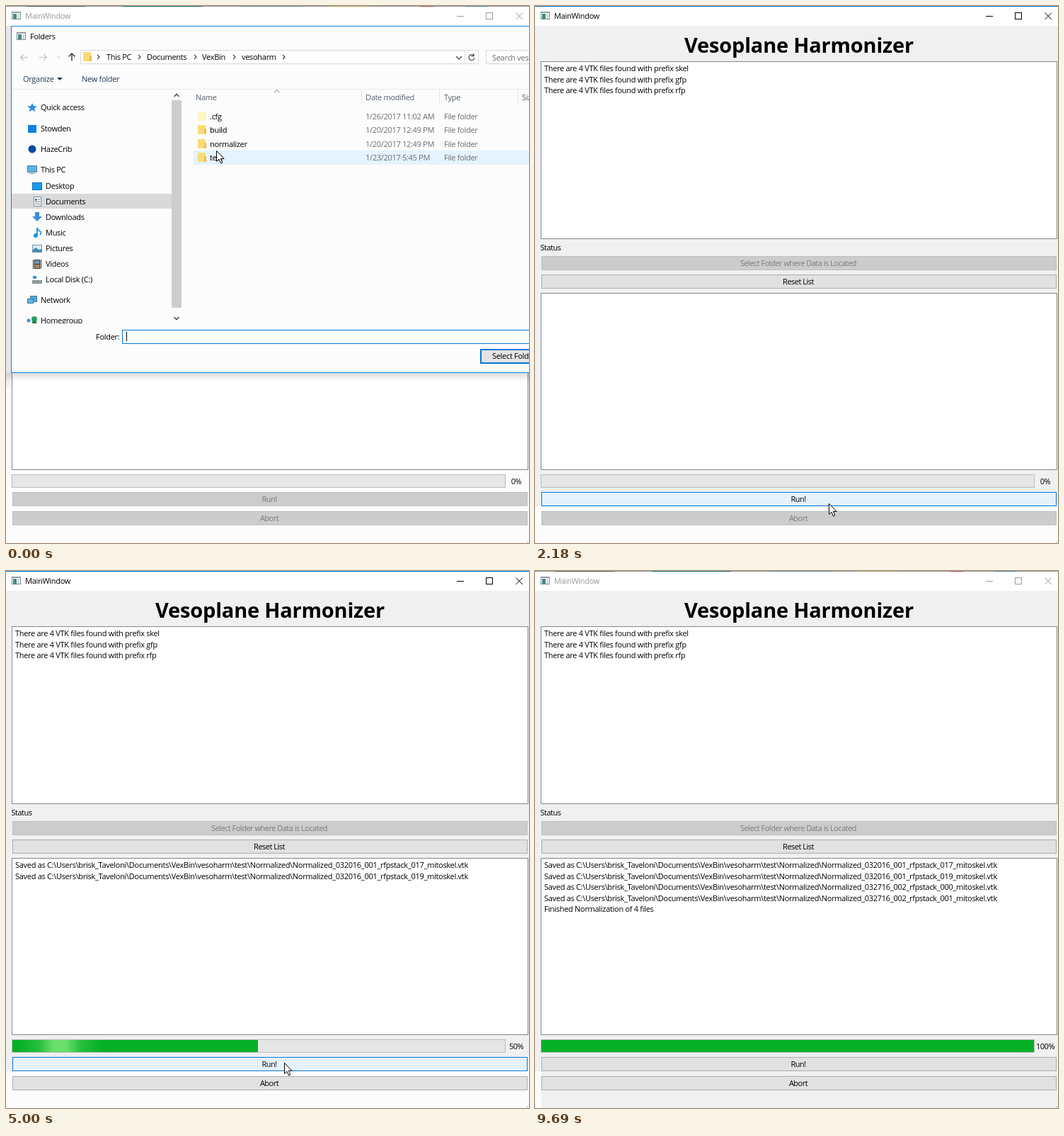
Write an HTML page that moves like this. It is 739 px wide and 758 px high and loops after 9.83 s.

```html
<!DOCTYPE html>
<html lang="en">
<head>
<meta charset="utf-8">
<title>Normalization run</title>
<style>
  html, body { margin: 0; width: 100%; height: 100%; overflow: hidden; background: #fcfcfc; }
  #stage { display: block; width: 739px; height: 758px; }
  text { font: 11px "Open Sans", "Noto Sans", sans-serif; letter-spacing: -.3px; white-space: pre; }
  text.label { letter-spacing: -.5px; }
  text.big { font-size: 29px; font-weight: 700; letter-spacing: -.2px; }
  rect { shape-rendering: crispEdges; }
</style>
</head>
<body>
<svg id="stage" viewBox="0 0 739 758"></svg>
<script>
const LOOP = 9830;

// Each step changes some fields of the state and keeps the others.
const STEPS = [
  [0, { cur: [297, 204], caret: true, dlg: 1, strip: false, active: false, picked: false,
        run: 'off', abort: 'off', lines: 0, pct: 0, glow: false, body: 538, foot: false }],
  [120, { cur: [283, 212], caret: false }],
  [520, { cur: [282, 212] }],
  [670, { picked: true }],
  [820, { cur: [411, 274], strip: true }],
  [940, { cur: [640, 480] }],
  [1090, { cur: [700, 490] }],
  [1210, { cur: [735, 497] }],
  [1360, { dlg: .5, active: true, body: 706 }],
  [1490, { dlg: .06, cur: [735, 500], run: 'normal' }],
  [1760, { dlg: 0, cur: [679, 501] }],
  [1910, { cur: [536, 501] }],
  [2060, { cur: [455, 600] }],
  [2180, { cur: [415, 702], run: 'hot' }],
  [2330, { cur: [400, 705] }],
  [2450, { cur: [394, 698] }],
  [2600, { cur: [393, 694], run: 'down' }],
  [2730, { abort: 'normal' }],
  [2880, { run: 'hot' }],
  [3750, { lines: 1 }],
  [4580, { pct: 25, glow: true }],
  [4730, { lines: 2, pct: 50 }],
  [4850, {}], [5000, {}], [5120, {}],
  [5270, { cur: null }],
  [5390, {}], [5510, {}], [5660, {}],
  [5810, { run: 'normal', foot: true }],
  [5930, {}], [6050, {}], [6200, {}], [6320, {}],
  [6470, { lines: 3, pct: 75 }],
  [7620, { glow: false }],
  [7920, { lines: 4, pct: 100 }],
  [8040, { lines: 5 }],
  [9690, { active: false }],
];

const STYLES = {
  off: ['#ccc', '#bfbfbf', '#7b7b7b'],
  normal: ['#e1e1e1', '#adadad', '#000'],
  hot: ['#e5f1fb', '#0078d7', '#000'],
  down: ['#cce4f7', '#005499', '#000'],
};

const rect = (x, y, w, h, fill, extra = '') =>
  `<rect x="${x}" y="${y}" width="${w}" height="${h}" fill="${fill}" ${extra}/>`;
const box = (x, y, w, h, fill, stroke, width = 1) =>
  rect(x + .5, y + .5, w - 1, h - 1, fill, `stroke="${stroke}" stroke-width="${width}"`);
const text = (x, y, str, fill = '#000', extra = '') =>
  `<text x="${x}" y="${y}" fill="${fill}" ${extra}>${str}</text>`;
const mid = (x, y, str, fill, cls = 'label') => text(x, y, str, fill, `text-anchor="middle" class="${cls}"`);
const line = (d, stroke, width = 1) =>
  `<path d="${d}" fill="none" stroke="${stroke}" stroke-width="${width}"/>`;
const shape = (d, fill) => `<path d="${d}" fill="${fill}"/>`;
const dot = (x, y, r, fill) => `<circle cx="${x}" cy="${y}" r="${r}" fill="${fill}"/>`;

function button(y, label, mode) {
  const [fill, stroke, ink] = STYLES[mode];
  return box(9, y, 728, 20, fill, stroke) + mid(372, y + 14, label, ink);
}

const appIcon = (x, y) => box(x, y, 13, 11, '#fff', '#808890') +
  rect(x + 1, y + 1, 11, 1, '#a9b4bd') + rect(x + 2, y + 3, 5, 7, '#3f8a86') + rect(x + 8, y + 3, 3, 7, '#d5dadd');

const folder = (x, y, light) =>
  rect(x, y, 11, 13, light ? '#fdf6c4' : '#fbdc7a') +
  rect(x + 9, y + 5, 3, 8, light ? '#fbf3bd' : '#eec04c');

function titleBar(active) {
  const ink = active ? '#000' : '#999';
  const edge = active ? rect(0, 0, 739, 1, '#0078d7') :
    rect(0, 0, 739, 1, '#8f9799') + rect(28, 0, 84, 1, '#4d5b5e') + rect(165, 0, 112, 1, '#0c6468') +
    rect(330, 0, 90, 1, '#5c8f96') + rect(455, 0, 60, 1, '#b8a06a') + rect(585, 0, 20, 1, '#b3473d') +
    rect(650, 0, 30, 1, '#3f79a8');
  return rect(0, 0, 739, 28, '#fff') + edge + appIcon(8, 8) +
    text(27, 18, 'MainWindow', ink) +
    rect(637, 14, 10, 1, ink) + box(678, 9, 10, 10, 'none', ink) +
    line('M720.5 9.5l9.5 9.5m0-9.5l-9.5 9.5', ink);
}

function logLine(i) {
  const id = ['032016_001_rfpstack_017', '032016_001_rfpstack_019',
              '032716_002_rfpstack_000', '032716_002_rfpstack_001'][i];
  const dir = String.raw`C:\Users\brisk_Taveloni\Documents\VexBin\vesoharm\test\Normalized`;
  return id ? `Saved as ${dir}\\Normalized_${id}_mitoskel.vtk` : 'Finished Normalization of 4 files';
}

const list = (y, lines) => lines.map((s, i) => text(13, y + Math.round(i * 15.6), s)).join('');

function progress(s, time) {
  const width = Math.floor(697 * s.pct / 100) - 1;
  const glowX = 187 + .235 * (time - 5510);
  const glow = s.glow ? rect(glowX - 58, 0, 116, 17, 'url(#glow)') : '';
  const bar = `<svg x="9" y="662" width="${width}" height="17">${rect(0, 0, 696, 17, '#06b025')}${glow}</svg>`;
  return box(8, 661, 698, 19, '#e6e6e6', '#bcbcbc') + (s.pct ? bar : '') + mid(721, 675, s.pct + '%');
}

function mainWindow(s, time) {
  const found = s.run === 'off' ? [] :
    ['skel', 'gfp', 'rfp'].map(p => `There are 4 VTK files found with prefix ${p}`);
  return rect(0, 0, 739, 758, '#fcfcfc') + rect(0, 28, 739, s.body - 28, '#f0f0f0') +
    (s.foot ? rect(9, 706, 730, 52, '#f0f0f0') : '') +
    titleBar(s.active) +
    mid(373, 66, 'Vesoplane Harmonizer', '#000', 'big') +
    box(8, 78, 730, 251, '#fff', '#828790') + list(92, found) +
    text(7.5, 345, 'Status', '#000', 'class="label"') +
    button(353, 'Select Folder where Data is Located', 'off') +
    button(379, 'Reset List', 'normal') +
    box(8, 405, 730, 250, '#fff', '#828790') +
    list(419, Array.from({ length: s.lines }, (_, i) => logLine(i))) +
    progress(s, time) +
    button(686, 'Run!', s.run) + button(713, 'Abort', s.abort) +
    rect(736, 756, 2, 1, '#b0b0b0');
}

// Small sidebar icons, drawn around (x, y).
const ICONS = {
  star: (x, y) => shape(`M${x} ${y - 6}l2 4 5 .5-4 3 1.5 5-4.5-3-4.5 3 1.5-5-4-3 5-.5z`, '#2e8fdc'),
  square: (x, y) => rect(x - 6, y - 5, 12, 11, '#1081de'),
  circle: (x, y) => dot(x, y, 5.5, '#0b4aa2'),
  pc: (x, y) => box(x - 7, y - 6, 14, 10, '#59b4ea', '#5d7c90') + rect(x - 4, y + 5, 8, 1, '#7d8d98'),
  desk: (x, y) => box(x - 7, y - 5, 14, 11, '#1b9af0', '#1272b8'),
  doc: (x, y) => box(x - 5, y - 7, 11, 14, '#fff', '#7f8c96') + rect(x - 3, y - 4, 3, 3, '#4b83b5') +
    rect(x + 1, y - 3, 3, 1, '#6f7f8b') + rect(x - 3, y, 7, 1, '#6f7f8b') + rect(x - 3, y + 3, 7, 1, '#6f7f8b'),
  down: (x, y) => shape(`M${x - 3} ${y - 7}h6v6h4l-7 7-7-7h4z`, '#3a8ede'),
  note: (x, y) => dot(x - 2, y + 4, 3, '#1e90e0') + line(`M${x} ${y + 4}v-11q1 4 4 5t0 5`, '#1e90e0', 1.7),
  pic: (x, y) => box(x - 7, y - 5, 14, 11, '#d8effb', '#7f929e') +
    shape(`M${x - 6} ${y + 5}v-3l4-3 4 3 4-1v4z`, '#3d8cb5'),
  film: (x, y) => rect(x - 6, y - 6, 12, 13, '#333') + rect(x - 3, y - 5, 6, 5, '#7096ba') +
    rect(x - 3, y + 1, 6, 5, '#b58a5c') + line(`M${x - 4.5} ${y - 6}v13m9-13v13`, '#ddd'),
  disk: (x, y) => rect(x - 7, y + 1, 14, 5, '#8c969c') + rect(x + 3, y + 3, 2, 1, '#5ff07a') +
    rect(x - 6, y - 5, 5, 4, '#2b9ae8'),
  net: (x, y) => box(x - 3, y - 6, 10, 9, '#4aa5e0', '#4b7894') + box(x - 7, y - 2, 9, 7, '#57b6ec', '#4b7894'),
  home: (x, y) => dot(x - 5, y, 2.5, '#3c8fd6') + dot(x + 3, y - 2, 4, '#2e9a62') + dot(x + 3, y + 4, 3.5, '#25784b'),
};

const SIDEBAR = [
  ['star', 'Quick access', 143], ['square', 'Stowden', 173], ['circle', 'HazeCrib', 202],
  ['pc', 'This PC', 231], ['desk', 'Desktop', 254, 1], ['doc', 'Documents', 276, 1],
  ['down', 'Downloads', 298, 1], ['note', 'Music', 320, 1], ['pic', 'Pictures', 342, 1],
  ['film', 'Videos', 364, 1], ['disk', 'Local Disk (C:)', 386, 1],
  ['net', 'Network', 415], ['home', 'Homegroup', 444],
];

const FILES = [
  ['.cfg', '1/26/2017 11:02 AM'], ['build', '1/20/2017 12:49 PM'],
  ['normalizer', '1/20/2017 12:49 PM'], ['test', '1/23/2017 5:45 PM'],
];

function navigation() {
  const crumbs = [['This PC', 142], ['Documents', 199], ['VexBin', 277], ['vesoharm', 333]];
  const gray = '#c9c9c9';
  return line('M31 72.5H20.5m4.5-4.5l-4.5 4.5 4.5 4.5', gray, 1.4) +
    line('M47 72.5h10.5m-4.5-4.5l4.5 4.5-4.5 4.5', gray, 1.4) +
    line('M72 71l2.5 2.5 2.5-2.5', gray) +
    line('M93 77.5V67m-4.5 4.5l4.5-4.5 4.5 4.5', '#444', 1.5) +
    box(105, 62, 563, 20, '#fff', '#d9d9d9') + rect(648, 62, 1, 20, '#d9d9d9') + folder(109, 65) +
    crumbs.map(([s, x]) => text(x, 76, s)).join('') +
    [129, 187, 266, 321, 391].map(x => line(`M${x} 69l3 3-3 3`, '#444', 1.2)).join('') +
    line('M636 71l4 4 4-4', '#555', 1.5) +
    line('M661 70a4 4 0 1 0 1 3m-1-6v3.5h-3.5', '#555', 1.3) +
    box(678, 62, 80, 20, '#fff', '#d9d9d9') + text(687, 77, 'Search vesoharm', '#6d6d6d') +
    text(24, 107, 'Organize', '#1e395b') + shape('M72 101h8l-4 4z', '#1e395b') +
    text(107, 107, 'New folder', '#1e395b') + rect(8, 117, 731, 1, '#e8e8e8');
}

function sidebar() {
  return rect(8, 265, 226, 21, '#d9d9d9') +
    SIDEBAR.map(([icon, label, y, deep]) =>
      ICONS[icon](deep ? 44 : 37, y) + text(deep ? 56 : 49, y + 4, label)).join('') +
    rect(8, 448, 226, 9, '#fcfcfc') +
    rect(234, 133, 14, 293, '#cdcdcd') +
    line('M237.5 128l3.5-3.5 3.5 3.5M237.5 439l3.5 3.5 3.5-3.5', '#505050', 1.6);
}

function files(s) {
  const heads = [['Name', 268], ['Date modified', 508], ['Type', 619], ['Size', 729]];
  const mark = s.picked ? box(265, 204, 490, 20, '#cce8ff', '#99d1ff') : rect(265, 204, 474, 20, '#e5f3ff');
  return heads.map(([h, x]) => text(x, 133, h, '#555f6b')).join('') +
    [502, 612, 723].map(x => rect(x, 118, 1, 22, '#e5e5e5')).join('') +
    line('M379 122l3.5-3.5 3.5 3.5', '#777') + mark +
    FILES.map(([name, date], i) => {
      const y = Math.round(156 + i * 19.3);
      return folder(271, y - 7, i === 0) + text(288, y + 4, name) +
        text(508, y + 4, date, '#6d6d6d') + text(619, y + 4, 'File folder', '#6d6d6d');
    }).join('');
}

function dialog(s) {
  if (!s.dlg) return '';
  // The closing dialog shrinks a little while it fades.
  const k = 1 - .047 * (1 - s.dlg);
  const move = `translate(${425 * (1 - k)} ${252 * (1 - k)}) scale(${k})`;
  return `<g opacity="${s.dlg}" transform="${move}">` +
    rect(0, 28, 7, 490, '#e6e6e6') + rect(0, 518, 739, 12, 'url(#shade)') +
    box(7, 28, 760, 490, '#fcfcfc', '#1883d7') +
    appIcon(15, 37) + text(34, 47, 'Folders') +
    navigation() + sidebar() + files(s) +
    (s.strip ? rect(165, 448, 574, 9, '#f0f0f0') : '') +
    text(127, 471, 'Folder:') + box(164, 457, 600, 20, '#fff', '#0078d7') +
    (s.picked ? text(170, 471, 'test') : '') + (s.caret ? rect(170, 460, 1, 13, '#000') : '') +
    rect(671, 485, 100, 19, '#e4e4e4', 'stroke="#0078d7" stroke-width="2"') +
    text(687, 498, 'Select Folder') + '</g>';
}

const cursor = ([x, y]) =>
  `<path transform="translate(${x + .5} ${y + .5})" d="M0 0V15L3.5 11.8L6 17.5L8.3 16.5L5.9 11H10.6Z" fill="#fff" stroke="#000"/>`;

const DEFS = `<defs>
  <linearGradient id="glow">
    <stop offset="0" stop-color="#74e474" stop-opacity="0"/>
    <stop offset=".25" stop-color="#74e474" stop-opacity=".3"/>
    <stop offset=".42" stop-color="#74e474" stop-opacity=".9"/>
    <stop offset=".58" stop-color="#74e474" stop-opacity=".9"/>
    <stop offset=".75" stop-color="#74e474" stop-opacity=".3"/>
    <stop offset="1" stop-color="#74e474" stop-opacity="0"/>
  </linearGradient>
  <linearGradient id="shade" x2="0" y2="1">
    <stop stop-color="#000" stop-opacity=".14"/>
    <stop offset="1" stop-color="#000" stop-opacity="0"/>
  </linearGradient>
</defs>`;

let last = {};
const states = STEPS.map(([time, change]) => ({ time, s: last = { ...last, ...change } }));

const stage = document.getElementById('stage');
const start = performance.now();
let shown = -1;

function frame() {
  const t = (performance.now() - start) % LOOP;
  let i = states.length - 1;
  while (i > 0 && states[i].time > t) i--;
  if (i !== shown) {
    const { time, s } = states[shown = i];
    stage.innerHTML = DEFS + mainWindow(s, time) + dialog(s) + (s.cur ? cursor(s.cur) : '');
  }
  requestAnimationFrame(frame);
}
frame();
</script>
</body>
</html>
```
